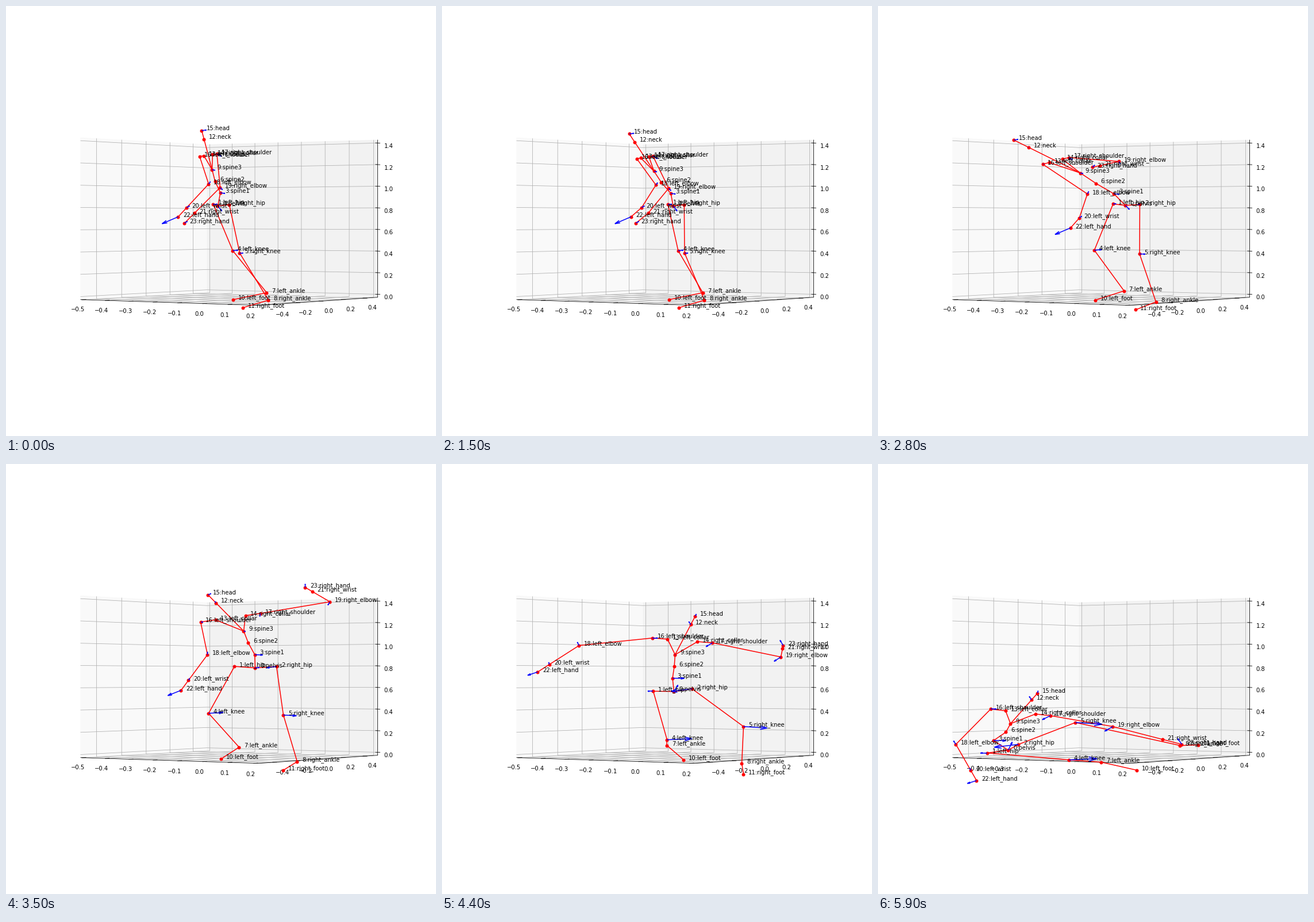
These frames come from a looping animation (748 px wide and 748 px high, 6 s). A matplotlib script:

```python
import numpy as np
import matplotlib.pyplot as plt
from matplotlib.animation import FuncAnimation
from matplotlib.collections import LineCollection

SIZE, DPI = 748, 72
FRAMES, STEP = 60, 100

NAMES = ("pelvis left_hip right_hip spine1 left_knee right_knee spine2 left_ankle "
         "right_ankle spine3 left_foot right_foot neck left_collar right_collar head "
         "left_shoulder right_shoulder left_elbow right_elbow left_wrist right_wrist "
         "left_hand right_hand").split()
PARENT = [0, 0, 0, 0, 1, 2, 3, 4, 5, 6, 7, 8, 9, 9, 9, 12, 13, 14, 16, 17, 18, 19, 20, 21]

# Waypoints of the leading joints; all other joints follow from them
BEATS = (2100, 3500, 4400, 5200, 5900)
PATHS = {
    "pelvis": [(368, 348), (433, 355), (403, 396), (331, 444), (226, 498)],
    "spine3": [(358, 285), (413, 291), (405, 332), (361, 389), (230, 452)],
    "head": [(340, 217), (351, 228), (440, 265), (428, 324), (277, 399)],
    "left_elbow": [(352, 310), (350, 332), (238, 316), (231, 384), (135, 488)],
    "right_elbow": [(372, 316), (563, 240), (589, 336), (548, 395), (408, 457)],
    "left_hand": [(299, 367), (304, 394), (166, 362), (170, 441), (171, 551)],
    "right_hand": [(310, 378), (520, 215), (593, 316), (664, 421), (528, 488)],
    "left_knee": [(394, 426), (352, 434), (391, 480), (380, 520), (332, 515)],
    "right_knee": [(406, 430), (482, 437), (524, 457), (539, 421), (343, 450)],
    "left_ankle": [(453, 499), (405, 493), (391, 490), (324, 511), (388, 519)],
    "right_ankle": [(456, 512), (506, 518), (521, 521), (590, 500), (525, 490)],
    "left_foot": [(395, 511), (374, 513), (420, 515), (338, 534), (450, 533)],
    "right_foot": [(412, 525), (482, 533), (524, 540), (656, 506), (557, 489)],
}

# Forward push of the hips and tilt of the trunk above them
BEND_BEATS = (0, 900, 2100, 2700, 3500)
BENDS = [(0, 0), (10, 0.06), (47, -0.84), (25, -1.0), (0, 0)]
GROUND, WAIST = 500, 348

# Arrow at rest and in the fall
ARROWS = {
    "pelvis": [(7, 9), (7, -14)], "left_hip": [(7, 0), (-12, 0)],
    "right_hip": [(0, 0), (-42, 5)], "spine1": [(8, 1), (22, 0)],
    "left_knee": [(9, -1), (48, -2)], "right_knee": [(6, 0), (46, 3)],
    "spine3": [(5, 1), (0, 0)], "head": [(8, -1), (1, -4)],
    "neck": [(0, 0), (-4, -6)], "left_shoulder": [(0, 0), (10, 0)],
    "right_shoulder": [(8, 4), (-14, 7)], "left_elbow": [(3, -4), (-4, -6)],
    "right_elbow": [(4, 4), (-14, 8)], "left_wrist": [(5, -3), (-2, -4)],
    "left_hand": [(-28, 12), (-16, 5)], "right_hand": [(5, -3), (-7, -10)],
}


def ramp(t, t0, t1):
    u = np.clip((t - t0) / (t1 - t0), 0, 1)
    return u * u * (3 - 2 * u)


def lerp(a, b, w):
    a, b = np.asarray(a, float), np.asarray(b, float)
    return a + (b - a) * w


def spline(t, times, points):
    """Smooth curve through the points, still before and after them."""
    times, points = np.array(times, float), np.array(points, float)
    t = np.clip(t, times[0], times[-1])
    slopes = np.gradient(points, times, axis=0)
    i = min(np.searchsorted(times, t, side="right") - 1, len(times) - 2)
    h = times[i + 1] - times[i]
    u = (t - times[i]) / h
    pull = slopes[i] * (1 - u) - slopes[i + 1] * u
    return lerp(points[i], points[i + 1], u * u * (3 - 2 * u)) + h * u * (1 - u) * pull


def pose_at(t):
    p = {name: spline(t, BEATS, path) for name, path in PATHS.items()}
    opened = ramp(t, 2300, 3500)
    drop = (p["pelvis"][1] - WAIST) / 150

    # The throwing arm swings up in an arc
    whip = np.sin(np.pi * np.clip((t - 3500) / 900, 0, 1))
    for name in ("right_elbow", "right_hand"):
        p[name] = p[name] + np.array([36, -50]) * whip

    curve = np.array([8 - 35 * drop, 0])
    p["spine1"] = lerp(p["pelvis"], p["spine3"], 0.36) + curve
    p["spine2"] = lerp(p["pelvis"], p["spine3"], 0.68) + curve / 4
    p["neck"] = lerp(p["spine3"], p["head"], 0.78)
    p["left_hip"] = p["pelvis"] + (-8 - 28 * opened, -3 + 8 * drop)
    p["right_hip"] = p["pelvis"] + (20 + 18 * opened - 20 * drop, -2 - 8 * drop)

    chest = lerp(p["spine3"], p["head"], 0.37)
    half = np.array([15 + 37 * opened, 0.12 * (p["head"] - p["spine3"])[0]])
    for side, sign in (("left", -1), ("right", 1)):
        p[side + "_shoulder"] = chest + sign * half
        p[side + "_collar"] = chest + sign * half / 2
        p[side + "_wrist"] = lerp(p[side + "_elbow"], p[side + "_hand"], 0.72)

    xy = np.array([p[name] for name in NAMES])
    push, tilt = spline(t, BEND_BEATS, BENDS)
    y = xy[:, 1]
    xy[:, 0] += (push * np.clip((GROUND - y) / (GROUND - WAIST), 0, 1)
                 + tilt * np.maximum(WAIST - y, 0))
    xy[:, 1] += 0.12 * abs(tilt) * np.maximum(WAIST - y, 0)
    return xy


fig = plt.figure(figsize=(SIZE / DPI, SIZE / DPI), dpi=DPI, facecolor="white")
ax = fig.add_axes([0, 0, 1, 1])
ax.set_xlim(-0.5, SIZE - 0.5)
ax.set_ylim(SIZE + 0.3, 0.3)
ax.axis("off")
plt.rcParams["font.family"] = "DejaVu Sans"

# Corners of the box: left, front, right, back; then the upper three
L, F, R, B = (129, 511), (439, 521), (646, 507), (349, 499)
LT, RT, BT = (129, 229), (646, 233), (349, 241)


def spaced(x0, x1, n, k):
    """Tick places that widen along the axis as perspective does."""
    u = np.linspace(0, 1, n)
    return x0 + (x1 - x0) * (u + k * u * (u - 1))


def on_edge(a, b, xs):
    return [(x, np.interp(x, (a[0], b[0]), (a[1], b[1]))) for x in xs]


def label(x, y, s):
    ax.text(x, y, s.replace("-", "\u2212"), fontsize=10, ha="center",
            va="center_baseline", zorder=3)


for corners, grey in (((L, B, BT, LT), 0.975), ((B, R, RT, BT), 0.95), ((L, F, R, B), 0.9625)):
    ax.add_patch(plt.Polygon(corners, fc=str(grey), ec="none", zorder=0))

wall_r, front_l = spaced(354, 639, 8, 0.05), spaced(134, 433, 8, 0.057)
wall_l, front_r = spaced(157, 325, 5, -0.055), spaced(468, 625, 5, -0.05)
grid, ticks = [], []
for wall, front, low, high, edge in ((wall_r, front_l, (B, R), (BT, RT), (L, F)),
                                     (wall_l, front_r, (L, B), (LT, BT), (F, R))):
    for p, q, r in zip(on_edge(*edge, front), on_edge(*low, wall), on_edge(*high, wall)):
        grid.append([p, q, r])
        d = np.subtract(q, p) / np.hypot(*np.subtract(q, p))
        ticks.append([np.array(p) - 3 * d, np.array(p) + 5 * d])

for i in range(8):
    yr = 501.8 - 37.6 * i
    grid.append([(129, 505.8 - 38.75 * i), (349, 494 - 35.35 * i), (646, yr)])
    ticks.append([(642, yr - 0.2), (650.5, yr + 0.2)])
    label(665, yr + 4.7, f"{0.2 * i:.1f}")

ax.add_collection(LineCollection(grid, colors="#b0b0b0", linewidths=0.8, zorder=1))
ax.add_collection(LineCollection(ticks + [[L, F, R, RT]], colors="black",
                                 linewidths=0.8, zorder=2))

for i, x in enumerate(spaced(125, 425, 8, 0.057)):
    label(x, 527.3 + 1.65 * i, f"{(i - 5) / 10:.1f}")
for i, x in enumerate(spaced(480, 637, 5, -0.05)):
    label(x, 536.3 - 2.9 * i, f"{(i - 2) / 5:.1f}")

bones = ax.add_collection(LineCollection([], colors="red", linewidths=1.5, zorder=4))
dots, = ax.plot([], [], "o", color="red", ms=5, mew=1, zorder=5)
arrows = ax.add_collection(LineCollection([], colors="blue", linewidths=1.5, zorder=6))
tags = [ax.text(0, 0, f"{j}:{name}", fontsize=10, zorder=7) for j, name in enumerate(NAMES)]


def arrow_lines(start, vec):
    tip = start + vec
    lines = [[start, tip]]
    for a in (-0.26, 0.26):
        c, s = np.cos(a), np.sin(a)
        lines.append([tip, tip - 0.3 * np.array([[c, -s], [s, c]]) @ vec])
    return lines


def draw(n):
    t = n * STEP
    xy = pose_at(t)
    bones.set_segments([[xy[PARENT[j]], xy[j]] for j in range(1, 24)])
    dots.set_data(xy[:, 0], xy[:, 1])
    turn = ramp(t, 2300, 5000)
    arrows.set_segments([line for name, ends in ARROWS.items()
                         for line in arrow_lines(xy[NAMES.index(name)], lerp(*ends, turn))])
    for tag, (x, y) in zip(tags, xy):
        tag.set_position((x + 8.5, y - 0.3))
    return [bones, dots, arrows, *tags]


anim = FuncAnimation(fig, draw, frames=FRAMES, interval=STEP, repeat=True, repeat_delay=0)
plt.show()
```
